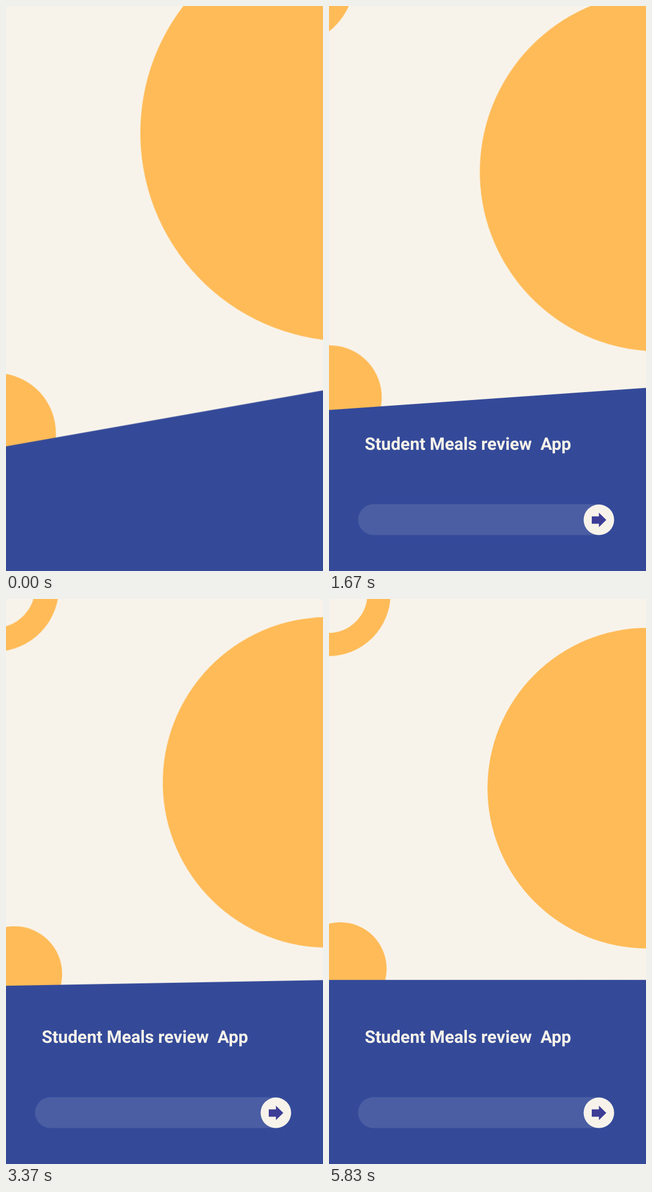
Animation of 561x998 px, one loop 6.33 s. Source, as an HTML page without scripts:

```html
<!DOCTYPE html>
<html lang="en">
<head>
<meta charset="utf-8">
<title>Student Meals review App</title>
<style>
  :root {
    --cream: #f8f3ea;
    --orange: #ffbb57;
    --blue: #344a99;
    --loop: 6330ms;
    --cubic-out: cubic-bezier(.333, 1, .667, 1);
    --tumble: cubic-bezier(0, 0, .58, 1);
  }
  html, body { margin: 0; width: 100%; height: 100%; overflow: hidden; background: var(--cream); }
  svg { display: block; width: 100%; height: 100%; }

  /* the whole backdrop zooms out and levels around the stage centre */
  .scene {
    fill: var(--orange);
    transform-origin: 280.5px 499px;
    animation: settle var(--loop) var(--cubic-out) infinite;
  }
  .ring {
    fill: none;
    stroke: var(--orange);
    stroke-width: 41px;
    animation: drift var(--loop) var(--cubic-out) infinite;
  }
  .panel { fill: var(--blue); }
  @keyframes settle { from { transform: rotate(-10deg) scale(1.3); } }
  @keyframes drift { from { transform: translate(-7px, -11px); } }

  .item {
    --start: translateX(126px) rotate(20.3deg);
    transform-box: fill-box;
    transform-origin: center;
    animation: var(--loop) var(--tumble) infinite;
  }
  .title {
    font: 700 30.55px Roboto, sans-serif;
    text-rendering: geometricPrecision;
    fill: var(--cream);
    animation-name: title-in;
  }
  .bar { fill: #4b5ea3; animation-name: bar-in; }
  .button { fill: var(--cream); animation-name: button-in; }
  @keyframes title-in {
    0%, 6.5% { opacity: 0; transform: var(--start); }
    10.5% { opacity: 1; }
    17.6% { transform: none; }
  }
  @keyframes bar-in {
    0%, 9.9% { opacity: 0; transform: var(--start); }
    13.9% { opacity: 1; }
    21% { transform: none; }
  }
  @keyframes button-in {
    0%, 15.4% { opacity: 0; transform: var(--start); }
    19.4% { opacity: 1; }
    26.3% { transform: none; }
  }
</style>
</head>
<body>
<svg viewBox="0 0 561 998" preserveAspectRatio="none">
  <g class="scene">
    <circle cx="563.7" cy="334.2" r="283.2"/>
    <circle class="ring" cx="-1" cy="-9" r="89.5"/>
    <circle cx="20" cy="653" r="82"/>
    <rect class="panel" x="-300" y="672.8" width="1200" height="700"/>
  </g>
  <text class="item title" x="63.2" y="784.2">Student Meals review&#160; App</text>
  <rect class="item bar" x="51.5" y="880" width="453" height="54.5" rx="27.25"/>
  <g class="item button">
    <circle cx="477.6" cy="907.6" r="27"/>
    <path d="M465 901.5h12.7v-6.5l13 12.8-13 12.8v-6.2H465z" fill="#3d3d96"/>
  </g>
</svg>
</body>
</html>
```
